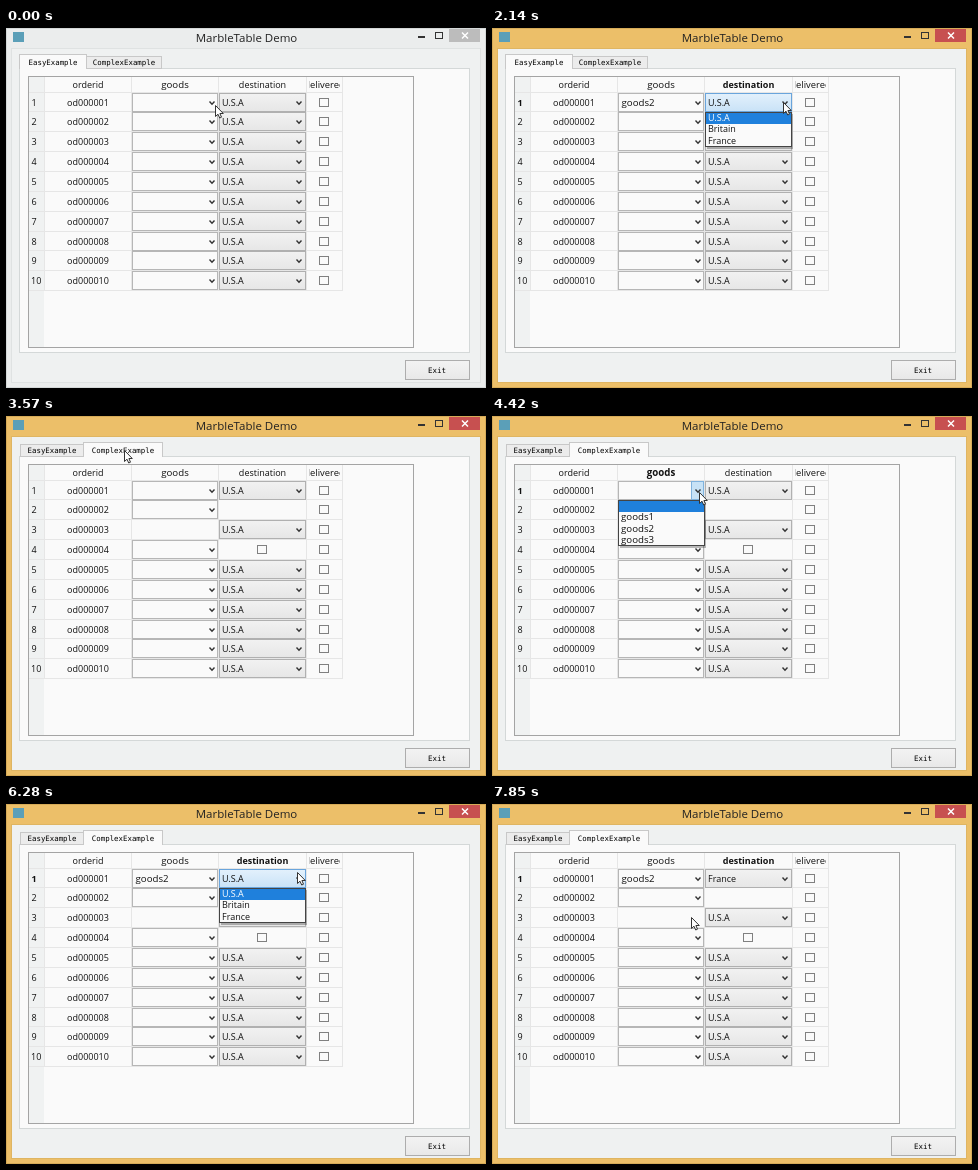
An HTML page with a canvas for the animation above (7.99 s loop, 480 by 360 pixels).

```html
<!DOCTYPE html>
<html lang="en">
<head>
<meta charset="utf-8">
<title>MarbleTable Demo</title>
<style>
html, body { margin: 0; width: 100%; height: 100%; overflow: hidden; background: #f0f0f0; }
canvas { display: block; width: 480px; height: 360px; }
</style>
</head>
<body>
<canvas id="stage"></canvas>
<script>
const canvas = document.getElementById('stage');
const scale = window.devicePixelRatio || 1;
canvas.width = 480 * scale;
canvas.height = 360 * scale;
const ctx = canvas.getContext('2d');

const LOOP = 7990, STEP = 142.7;
const UI = '"Open Sans", sans-serif';
const MONO = '"DejaVu Sans Mono", monospace';
const GOODS = ['', 'goods1', 'goods2', 'goods3'];
const PLACES = ['U.S.A', 'Britain', 'France'];
const COLUMNS = [38, 125, 212, 300, 336];
const PAPER = '#fafafa';
const rowTop = i => Math.round(64.6 + i * 19.85);

// Each entry changes part of the state from its time on.
const STATES = [
  [0, { active: false, complex: false, bold: '', open: '', hover: 0, goods: 0, place: 0, focus: '' }],
  [280, { active: true, bold: 'goods', focus: 'goods' }],
  [430, { open: 'goods' }],
  [850, { hover: 1 }],
  [1140, { hover: 2 }],
  [1420, { open: '', goods: 2 }],
  [1990, { bold: 'destination', focus: 'place' }],
  [2130, { open: 'place', hover: 0 }],
  [2420, { hover: 1 }],
  [2700, { open: '', place: 1 }],
  [3560, { complex: true, bold: '', focus: '', goods: 0, place: 0 }],
  [4270, { bold: 'goods', focus: 'goods', open: 'goods', hover: 0 }],
  [4700, { hover: 1 }],
  [4990, { hover: 2 }],
  [5270, { open: '', goods: 2 }],
  [5990, { bold: 'destination', focus: 'place' }],
  [6130, { open: 'place', hover: 0 }],
  [6560, { hover: 1 }],
  [6700, { hover: 2 }],
  [6990, { open: '', place: 2 }],
  [7270, { focus: '' }]
];

const POINTER = [
  [0, 209, 77], [570, 207, 76], [1280, 182, 107], [1430, 182, 108],
  [1990, 292, 73], [2280, 291, 75], [2570, 270, 101], [2850, 270, 102],
  [3420, 118, 34], [3700, 118, 34], [4140, 207, 76], [4420, 207, 76],
  [5140, 191, 108], [5420, 191, 108], [5990, 291, 69], [6280, 291, 68],
  [6850, 262, 112], [7140, 262, 113], [7850, 199, 113], [7990, 199, 113]
];

function stateAt(t) {
  const state = {};
  for (const [start, change] of STATES) if (start <= t) Object.assign(state, change);
  return state;
}

function pointerAt(t) {
  const i = Math.max(1, POINTER.findIndex(p => p[0] > t));
  const [t0, x0, y0] = POINTER[i - 1], [t1, x1, y1] = POINTER[i];
  const k = (t - t0) / (t1 - t0), e = k * k * (3 - 2 * k);
  return [Math.round(x0 + (x1 - x0) * e), Math.round(y0 + (y1 - y0) * e)];
}

function fill(x, y, w, h, color) {
  ctx.fillStyle = color;
  ctx.fillRect(x, y, w, h);
}

function box(x, y, w, h, color, border) {
  fill(x, y, w, h, color);
  ctx.strokeStyle = border;
  ctx.lineWidth = 1;
  ctx.strokeRect(x + .5, y + .5, w - 1, h - 1);
}

function text(value, x, y, { size = 9, align = 'left', weight = 400, family = UI, color = '#111' } = {}) {
  ctx.font = `${weight} ${size}px ${family}`;
  ctx.textAlign = align;
  ctx.fillStyle = color;
  ctx.fillText(value, x, y);
}

function path(points, color, width) {
  ctx.beginPath();
  points.forEach(([x, y]) => ctx.lineTo(x, y));
  ctx.strokeStyle = color;
  ctx.lineWidth = width;
  ctx.stroke();
}

function shade(y, h, top, bottom) {
  const gradient = ctx.createLinearGradient(0, y, 0, y + h);
  gradient.addColorStop(0, top);
  gradient.addColorStop(1, bottom);
  return gradient;
}

function arrow(x, y) {
  path([[x - 2.5, y - 1.5], [x, y + 1.2], [x + 2.5, y - 1.5]], '#333', 1.4);
}

function checkbox(x, y) {
  box(x - 5, y - 5, 10, 9, PAPER, '#808080');
}

function drawWindow(s) {
  const frame = s.active ? '#ecbf69' : '#ebeded';
  box(0, 0, 480, 360, frame, s.active ? '#d6ab58' : '#d4d8d8');
  box(5, 20, 470, 335, '#eff1f1', s.active ? '#dfb562' : '#dfe2e2');
  fill(7, 4, 11, 10, '#5b9fb8');
  text('MarbleTable Demo', 240.5, 14, { size: 11.5, align: 'center', color: '#222' });
  fill(412, 8, 7, 2, '#333');
  box(429, 4, 8, 7, frame, '#333');
  fill(443, 1, 31, 13, s.active ? '#c75050' : '#bcbcbc');
  path([[456, 4.5], [462, 10.5]], '#fff', 1.5);
  path([[462, 4.5], [456, 10.5]], '#fff', 1.5);
  box(399, 332, 65, 20, shade(332, 20, '#f3f3f3', '#e8e8e8'), '#adadad');
  text('Exit', 431, 345, { size: 7.5, align: 'center', family: MONO, color: '#000' });
}

function drawTab(label, x, w, selected) {
  const y = selected ? 26 : 28;
  box(x, y, w, 41 - y, selected ? PAPER : '#ececec', '#c8c8c8');
  if (selected) fill(x + 1, 40, w - 2, 2, PAPER);
  text(label, x + w / 2, 37, { size: 7.4, align: 'center', family: MONO, color: '#000' });
}

function drawTabs(s) {
  box(13, 40, 451, 285, PAPER, '#d4d8d8');
  const left = s.complex ? 14 : 13, split = s.complex ? 77 : 80;
  drawTab('EasyExample', left, split - left + 1, !s.complex);
  drawTab('ComplexExample', split, s.complex ? 80 : 76, s.complex);
}

function goodsCombo(y, value, focused) {
  box(126, y, 86, 19, PAPER, '#b6b6b6');
  if (focused) box(199, y, 13, 19, '#c7e2f6', '#7fb2dd');
  arrow(206, y + 10);
  text(value, 129.5, y + 13, { size: 9.7 });
}

function placeCombo(y, value, focused) {
  const face = focused ? shade(y, 19, '#e4f1fc', '#c8e2f7') : shade(y, 19, '#f2f2f2', '#e6e6e6');
  box(213, y, 87, 19, face, focused ? '#6aa5dc' : '#b0b0b0');
  arrow(293, y + 10);
  text(value, 216, y + 13);
}

function drawHeader(s) {
  const weight = name => s.bold === name ? 700 : 400;
  text('orderid', 82, 60, { align: 'center' });
  text('goods', 169, 60, { size: 9.7, align: 'center', weight: weight('goods') });
  text('destination', 256.5, 60, { align: 'center', weight: weight('destination') });
  ctx.save();
  ctx.beginPath();
  ctx.rect(303, 49, 31, 15);
  ctx.clip();
  text('delivered', 318.5, 60, { size: 9.4, align: 'center' });
  ctx.restore();
}

function drawRow(i, s) {
  const y = rowTop(i), first = i === 0;
  text(i + 1, i === 9 ? 25 : 25.5, y + 13, { weight: first && s.bold ? 700 : 400 });
  text('od' + String(i + 1).padStart(6, '0'), 82, y + 13, { align: 'center' });
  if (!(s.complex && i === 2))
    goodsCombo(y, first ? GOODS[s.goods] : '', first && s.focus === 'goods');
  if (s.complex && i === 3) checkbox(256, y + 10);
  else if (!(s.complex && i === 1))
    placeCombo(y, first ? PLACES[s.place] : PLACES[0], first && s.focus === 'place');
  checkbox(318, y + 10);
}

function drawTable(s) {
  box(22, 48, 386, 272, PAPER, '#a4a4a4');
  fill(23, 49, 15, 270, '#f0f2f2');
  for (let i = 0; i <= 10; i++) fill(23, rowTop(i) - 1, 314, 1, '#e6e6e6');
  for (const x of COLUMNS) fill(x, 49, 1, 214, '#e6e6e6');
  drawHeader(s);
  for (let i = 0; i < 10; i++) drawRow(i, s);
  if (s.focus === 'goods' && s.goods && !s.open) fill(163, 69, 1, 11, '#111');
}

function drawList(s) {
  const goods = s.open === 'goods';
  const items = goods ? GOODS : PLACES;
  const x = goods ? 126 : 213, h = Math.round(items.length * 11.3) + 1;
  fill(x + 2, 86, 86, h, '#0004');
  box(x, 84, 87, h, PAPER, '#444');
  items.forEach((item, i) => {
    const y = 84.5 + i * 11.3, on = i === s.hover;
    if (on) fill(x + 1, Math.round(y), 85, 11, '#1f80dc');
    text(item, x + 3, y + 8.5, { size: goods ? 9.7 : 9, color: on ? '#fff' : '#111' });
  });
}

function drawPointer([x, y]) {
  ctx.beginPath();
  [[0, 0], [0, 11], [2.5, 8.7], [4.2, 12.5], [6, 11.7], [4.4, 8], [7.8, 8]]
    .forEach(([dx, dy]) => ctx.lineTo(x + dx + .5, y + dy + .5));
  ctx.closePath();
  ctx.fillStyle = '#fff';
  ctx.fill();
  ctx.strokeStyle = '#333';
  ctx.lineWidth = 1;
  ctx.stroke();
}

function draw(now) {
  const t = Math.floor(((now % LOOP) + 8) / STEP) * STEP % LOOP;
  const state = stateAt(t);
  ctx.setTransform(scale, 0, 0, scale, 0, 0);
  drawWindow(state);
  drawTabs(state);
  drawTable(state);
  if (state.open) drawList(state);
  drawPointer(pointerAt(t));
}

let start;
function tick(now) {
  start ??= now;
  draw(now - start);
  requestAnimationFrame(tick);
}
draw(0);
requestAnimationFrame(tick);
</script>
</body>
</html>
```
